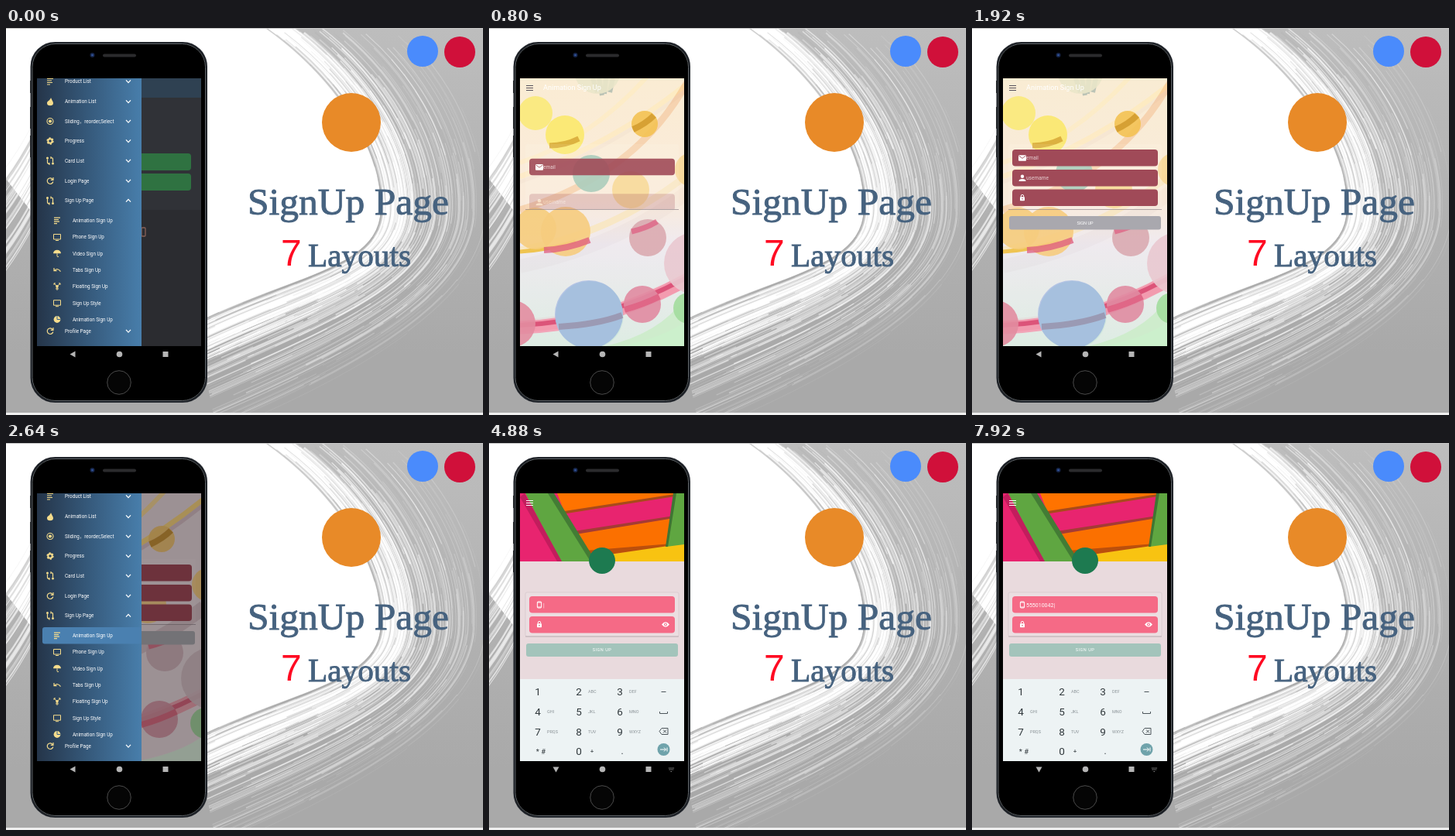
An HTML page with a canvas for the animation above (8 s loop, 616 px wide and 500 px high).

```html
<!DOCTYPE html>
<html lang="en">
<head>
<meta charset="utf-8">
<title>Sign up page layouts</title>
<style>
html, body { margin: 0; width: 100%; height: 100%; overflow: hidden; background: #fff; }
canvas, svg { position: absolute; left: 0; top: 0; display: block; }
svg text { font-family: Roboto, sans-serif; white-space: pre; }
svg .title { font-family: "Liberation Serif", serif; fill: #46627f; stroke: #46627f; stroke-width: .9; }
svg .seven { font-family: "Liberation Sans", sans-serif; fill: #ff0a22; }
</style>
</head>
<body>
<canvas id="back" width="616" height="500"></canvas>
<svg id="stage" width="616" height="500" viewBox="0 0 616 500"></svg>
<script>
const LOOP = 8000;
const el = id => document.getElementById(id);
const clamp = v => Math.max(0, Math.min(1, v));
const ramp = (t, start, len) => clamp((t - start) / len);
const easeOut = p => 1 - (1 - p) ** 3;

// ---- backdrop: a white hollow with a brushed edge on grey ----
function paintBackdrop() {
  const c = el('back').getContext('2d');
  let seed = 7;
  const rnd = () => (seed = (seed * 16807) % 2147483647) / 2147483647;
  // the edge of the hollow, pushed outwards by d
  const edge = d => {
    c.moveTo(365 + d * 1.3, -5);
    c.bezierCurveTo(450 + d * 1.2, 55, 515 + d, 150, 512 + d, 235);
    c.bezierCurveTo(510 + d, 320 + d * .3, 385 + d * .6, 345 + d * .9, 250 + d * .2, 410 + d);
  };
  const grey = c.createLinearGradient(0, 0, 0, 420);
  grey.addColorStop(0, '#bdbdbd');
  grey.addColorStop(1, '#a9a9a9');
  c.fillStyle = grey;
  c.fillRect(0, 0, 616, 500);

  c.fillStyle = '#fff';
  c.beginPath();
  edge(0);
  c.lineTo(35, 240);
  c.lineTo(0, 195);
  c.lineTo(0, -5);
  c.fill();

  for (let i = 0; i < 520; i++) {
    const light = rnd() < .7, spread = rnd() ** 2.2;
    const d = light ? spread * 115 : spread * 100 - 28;
    const alpha = (light ? .75 : .4) * (1 - spread * .75) * (.3 + rnd() * .7);
    c.strokeStyle = light ? `rgba(255,255,255,${alpha})` : `rgba(165,165,165,${alpha})`;
    c.lineWidth = .5 + rnd() * 1.8 * (1 - spread * .6);
    c.setLineDash([80 + rnd() * 220, 1000]);
    c.lineDashOffset = -rnd() * 620;
    c.beginPath();
    edge(d);
    c.stroke();
  }
  c.setLineDash([]);
  for (let i = 0; i < 50; i++) {
    const y = 150 + rnd() * 150;
    c.strokeStyle = rnd() < .65 ? 'rgba(255,255,255,.6)' : 'rgba(175,175,175,.4)';
    c.lineWidth = .5 + rnd() * 1.8;
    c.beginPath();
    c.moveTo(-5, y + 25);
    c.quadraticCurveTo(15, y, 36, y - 40);
    c.stroke();
  }
  c.fillStyle = '#c4c4c4';
  c.fillRect(0, 0, 616, 1);
  c.fillStyle = '#f0f0f0';
  c.fillRect(0, 497, 616, 3);
}

// ---- svg helpers ----
const box = (x, y, w, h, fill, r = 0, extra = '') =>
  `<rect x="${x}" y="${y}" width="${w}" height="${h}" rx="${r}" fill="${fill}" ${extra}/>`;
const disc = (x, y, r, fill, extra = '') => `<circle cx="${x}" cy="${y}" r="${r}" fill="${fill}" ${extra}/>`;
const poly = (points, fill) => `<polygon points="${points}" fill="${fill}"/>`;
const line = (d, col, w = 1, extra = '') =>
  `<path d="${d}" fill="none" stroke="${col}" stroke-width="${w}" ${extra}/>`;
const text = (x, y, s, size, fill, extra = '') =>
  `<text x="${x}" y="${y}" font-size="${size}" fill="${fill}" ${extra}>${s}</text>`;
const group = (id, body, extra = '') => `<g id="${id}" ${extra}>${body}</g>`;
const at = (x, y, body) => `<g transform="translate(${x} ${y})">${body}</g>`;
const mid = 'text-anchor="middle"';
const burger = col => line('M48 74.5h9M48 77.5h9M48 80.5h9', col, 1.1);

const YELLOW = '#f6dc8c';
const ink = (d, w = 1.2) => line(d, YELLOW, w);
const icons = {
  lines: ink('M-4-3.5h8M-4-1h6M-4 1.5h7M-4 4h4'),
  drop: `<path d="M1-5C2-2 4 0 4 2A4 3.2 0 0 1-4 2C-4-1 0-1 1-5" fill="${YELLOW}"/>`,
  radio: disc(0, 0, 4, 'none', `stroke="${YELLOW}" stroke-width="1.1"`) + disc(0, 0, 2.1, YELLOW),
  gear: disc(0, 0, 2.7, 'none', `stroke="${YELLOW}" stroke-width="2"`) +
    disc(0, 0, 4, 'none', `stroke="${YELLOW}" stroke-width="1.4" stroke-dasharray="2.2 2"`),
  swap: ink('M-3.5-2V2Q-3.5 4-1 4M3.5 2V-2Q3.5-4 1-4M-1 2.5V5.5M1-5.5V-2.5') +
    disc(-3.5, -3.5, 1.5, YELLOW) + disc(3.5, 3.5, 1.5, YELLOW),
  refresh: ink('M3.2-2A3.8 3.8 0 1 0 3.8 1M4-4.5V-1.2H.8'),
  tv: ink('M-4.5-3.5h9v6.5h-9zM-2 4.5h4', 1),
  umbrella: `<path d="M-5 0A5 4.5 0 0 1 5 0z" fill="${YELLOW}"/>` + ink('M0 0V3.5Q0 5 2 4', 1),
  undo: ink('M-4-2.5V1H-.5M-3.5 .5Q1-3 4.5 2'),
  people: ink('M-4-4L0 0L4-4M0 0V5M-2 3H2M2-4H4V-2M-2-4H-4V-2', 1) + disc(0, 0, 1.8, YELLOW),
  pie: disc(0, 0, 4.4, YELLOW) + line('M0-4.4V0H4.4', '#3a6287', 1)
};
const white = {
  mail: box(-5, -3.8, 10, 7.6, '#fff', 1) + line('M-4.5-3L0 .4L4.5-3', '#a04e5a', .9),
  person: disc(0, -2.2, 2.2, '#fff') + '<path d="M-4.5 4Q-4.5 1 0 1T4.5 4z" fill="#fff"/>',
  lock: box(-3, -1.2, 6, 5, '#fff', .7) + line('M-1.7-1V-2.4A1.7 1.7 0 0 1 1.7-2.4V-1', '#fff') + disc(0, 1.3, .8, '#c05a70'),
  phone: box(-2.6, -4, 5.2, 8, 'none', 1, 'stroke="#fff"') + line('M-2.6-3h5.2M-2.6 3h5.2', '#fff'),
  eye: '<path d="M-5 0Q0-6.4 5 0Q0 6.4-5 0" fill="#fff"/>' + disc(0, 0, 1.9, '#f56a86') + disc(0, 0, 1, '#fff')
};

// ---- pages ----
const darkPage = box(40, 65, 212, 346, '#464a51') + box(40, 65, 212, 25, '#456078') +
  box(40, 235, 212, 176, '#3f4147') +
  box(52, 162, 187, 22, '#45a860', 4) + box(52, 188, 187, 22, '#45a860', 4) +
  box(175, 258, 5, 11, 'none', 1, 'stroke="#c98f80" stroke-width="1.3"');

// x, y, radius, tinted colour, bright colour
const bubbles = [
  [140, 55, 30, '#9cc3b8', '#fff0cf'], [60, 110, 22, '#f2ca78', '#fdf27a'],
  [98, 138, 25, '#f5c878', '#fdf16a'], [201, 124, 17, '#f0c06c', '#f5c44e'],
  [132, 188, 24, '#98c2b7', '#a9cbb8'], [183, 209, 24, '#f5c878', '#f9dc9a'],
  [262, 183, 22, '#f5c878', '#f9dc9f'], [60, 259, 27, '#f0c780', '#f9cf7c'],
  [99, 263, 32, '#f3c67c', '#f9cf80'], [205, 271, 24, '#d0b0b8', '#deaab0'],
  [266, 304, 40, '#d3bcc2', '#f0ccd4'], [198, 357, 24, '#d493a2', '#e58aa2'],
  [258, 362, 20, '#9fd39a', '#a5dfa0'], [30, 382, 30, '#d69aa5', '#e78aa0']
];
const bubbleArt = k => bubbles.map(b => disc(b[0], b[1], b[2], b[k], 'opacity=".9"')).join('');
// darker parts of the stripes where circles lie over them
const overlaps = (gold, rose) =>
  line('M186 131Q202 124 213 113', gold, 8, 'opacity=".75"') +
  line('M78 152Q98 152 116 143', gold, 7, 'opacity=".65"') +
  line('M71 287Q100 286 130 274', rose, 8, 'opacity=".75"') +
  line('M184 263Q205 258 217 250', rose, 7, 'opacity=".7"') +
  line('M175 364Q200 357 220 347', rose, 8, 'opacity=".75"') +
  line('M90 386Q140 383 172 371', '#95809a', 8, 'opacity=".6"');
const tinted = box(40, 65, 212, 346, '#e6d6da') +
  '<path d="M170 411Q225 400 252 380V411z" fill="#d9ead9"/>' +
  line('M40 192Q160 150 256 72', '#f7d27f', 7) + line('M40 199Q160 157 256 79', '#d5bdc4', 5) +
  line('M40 174Q130 145 205 62', '#f5d596', 6) +
  line('M40 308Q170 280 256 212', '#d3bcc2', 18) +
  line('M40 385Q150 380 256 325', '#eba0ae', 17) + line('M40 384Q150 378 256 323', '#d8657f', 6) +
  bubbleArt(3) + disc(130, 371, 44, '#9cc3b7') + overlaps('#b98226', '#dd6079');
const bright = box(40, 65, 212, 346, 'url(#cream)') +
  '<path d="M150 411Q220 395 252 350V411z" fill="#c9f2c9"/>' +
  line('M40 235Q190 190 256 70', '#fbd3a6', 9) + line('M40 287Q160 265 256 190', '#fdecc0', 9) +
  line('M40 289Q80 286 112 276', '#f2c030', 5) +
  line('M134 65l6 18M142 65l4 22M151 65l-2 20M160 65l-4 18', '#7d9c94', 6, 'opacity=".6"') +
  line('M40 387Q150 384 256 325', '#f59ab0', 17) + line('M40 384Q150 380 256 322', '#de5078', 6) +
  bubbleArt(4) + disc(129, 370, 44, '#a9c0e8') + overlaps('#d19a25', '#e05a80');

const formRow = (i, y, icon, label) => group('row' + i,
  box(52, y, 188, 21.5, '#a04a58', 4) + at(65, y + 11, white[icon]) + text(70, y + 13, label, 6.5, '#e6cfd2'));
const bubblePage = tinted + group('bright', bright) + burger('#57515c') +
  text(70, 80.3, 'Animation Sign Up', 9.1, '#fff') +
  box(47, 150, 198, 84, '#fff', 2, 'opacity=".08"') + line('M47 234.5H245', '#8b7f86', 1, 'opacity=".65"') +
  `<g clip-path="url(#card)">${formRow(0, 157, 'mail', 'email')}${formRow(1, 183, 'person', 'username')}${formRow(2, 208.5, 'lock', '')}</g>` +
  group('row3', box(48, 243, 196, 17.5, '#a9a8ae', 3) + text(146, 254, 'SIGN UP', 5.6, '#fff', mid));

const artwork = box(40, 65, 212, 88, '#e8246f') +
  poly('88,65 240,65 238,69 98,91', '#ff7300') + poly('92,92 240,68 236,99 106,119', '#e8246f') +
  poly('105,118 240,96 235,134 126,146', '#fb7000') + poly('125,139 236,130 236,134 130,147', '#bb4f0c') +
  poly('91,89 240,66 240,69 94,92', '#a84a1a') + poly('103,115 239,94 239,97 106,119', '#a43b35') +
  poly('47,65 80,65 135,153 92,153', '#5fa641') + poly('76,65 84,65 138,153 131,153', '#437c35') +
  poly('40,70 46,65 94,153 88,153', '#c21d5d') +
  poly('135,147 252,130 252,153 135,153', '#f8c311') +
  poly('240,65 252,65 252,131 229,134', '#5fa641') + poly('238,65 242,65 231,134 228,134', '#3f7533');
const phonePage = box(40, 65, 212, 346, '#e9dadd') + artwork + burger('#fff') + disc(146, 152, 17, '#1d7a50') +
  box(47, 193, 198, 57, '#ebdee1', 2, 'stroke="#d5c6ca" stroke-width=".7"') + line('M47 250H245', '#bdafb4') +
  box(52, 198, 188, 21.5, '#f56a86', 4) + box(52, 224, 188, 21.5, '#f56a86', 4) +
  at(65, 209, white.phone) + at(65, 234.5, white.lock) + at(228, 234.5, white.eye) +
  text(70, 211.5, '', 7, '#fff', 'id="typed"') +
  box(48, 259, 196, 17, '#a3c4bb', 3) + text(146, 269.3, 'SIGN UP', 5.6, '#fff', mid + ' letter-spacing=".5"');

// ---- side menu ----
const mainRows = [
  [69, 'lines', 'Product List'], [95, 'drop', 'Animation List'], [120.5, 'radio', 'Sliding，reorder,Select'],
  [146, 'gear', 'Progress'], [171.5, 'swap', 'Card List'], [197.5, 'refresh', 'Login Page'],
  [223, 'swap', 'Sign Up Page'], [391.5, 'refresh', 'Profile Page']
];
const subRows = [
  ['lines', 'Animation Sign Up'], ['tv', 'Phone Sign Up'], ['umbrella', 'Video Sign Up'], ['undo', 'Tabs Sign Up'],
  ['people', 'Floating Sign Up'], ['tv', 'Sign Up Style'], ['pie', 'Animation Sign Up']
];
const menu = box(40, 65, 135, 346, 'url(#blue)') + box(47, 238, 128, 21.5, '#4a80b0', 3, 'id="pick"') +
  mainRows.map(([y, icon, label]) => at(57, y, icons[icon]) + text(76, y + 2.3, label, 6.3, '#fff') +
    at(158, y, line(y === 223 ? 'M-3 1.6L0-1.6L3 1.6' : 'M-3-1.6L0 1.6L3-1.6', '#fff', 1.3))).join('') +
  subRows.map(([icon, label], i) => at(66, 248.7 + i * 21.3, icons[icon]) +
    text(86, 251 + i * 21.3, label, 6.3, '#fff')).join('');

// ---- keyboard ----
const letters = ['', 'ABC', 'DEF', 'GHI', 'JKL', 'MNO', 'PRQS', 'TUV', 'WXYZ'];
const keyX = [63, 116, 169], keyY = [321, 347, 372.5, 398];
const keyboard = box(40, 305, 212, 106, '#edf3f4') +
  letters.map((s, i) => {
    const x = keyX[i % 3], y = keyY[i / 3 | 0];
    return text(x, y + 5, i + 1, 13.5, '#30383c', mid) + text(x + 12, y + 2, s, 5.5, '#8a9296');
  }).join('') +
  text(67, 402, '* #', 9.5, '#30383c', mid) + text(116, 403, 0, 13.5, '#30383c', mid) +
  text(133, 401, '+', 8, '#30383c', mid) + text(172, 402, '.', 12, '#30383c', mid) +
  line('M222.5 321.5h6M220.5 347v2.5h10v-2.5', '#4c555a') +
  line('M220 372.5l3-4h8v8h-8zM225 370.5l4 4M229 370.5l-4 4', '#4c555a') +
  disc(225.5, 396, 8, '#6fa3ab') + line('M221 396h7M226 393.5l2.5 2.5l-2.5 2.5M230 393.5v5', '#fff');

// ---- whole stage ----
el('stage').innerHTML = `<defs>
  <linearGradient id="blue"><stop stop-color="#253549"/><stop offset=".5" stop-color="#365a7c"/><stop offset="1" stop-color="#487eab"/></linearGradient>
  <linearGradient id="cream" x2="0" y2="1"><stop stop-color="#fff2d2"/><stop offset=".45" stop-color="#fff1dc"/><stop offset=".62" stop-color="#f2f0f5"/><stop offset="1" stop-color="#dcf2e6"/></linearGradient>
  <clipPath id="screen"><rect x="40" y="65" width="212" height="346"/></clipPath>
  <clipPath id="card"><rect x="47" y="150" width="198" height="84"/></clipPath></defs>` +
  disc(538, 30, 20, '#4a8bfc') + disc(586, 31, 20, '#d0103a') + disc(446, 122, 38, '#e88a28') +
  text(312, 241, 'SignUp Page', 49.5, '', 'class="title"') +
  text(355, 307, '7', 48, '', 'class="seven"') + text(390, 308, 'Layouts', 41.3, '', 'class="title"') +
  box(31, 68, 3, 16, '#333') + box(31, 102, 3, 28, '#333') + box(31, 139, 3, 28, '#333') + box(257, 104, 3, 28, '#333') +
  box(32.5, 19, 226.5, 464, '#000', 31, 'stroke="#20242a" stroke-width="2"') +
  box(34, 20.5, 223.5, 461, 'none', 30, 'stroke="#666b70" stroke-width=".9"') +
  disc(111.5, 35, 3, '#17264a') + disc(111.5, 35, 1.3, '#3456a0') + box(125, 33.5, 43, 4, '#2b2b2d', 2) +
  disc(146, 458, 15.3, '#050505', 'stroke="#4a4a4a"') +
  `<g clip-path="url(#screen)">${darkPage}${group('bubblePage', bubblePage)}${group('phonePage', phonePage)}` +
  box(40, 65, 212, 346, '#000', 0, 'id="shade"') + group('menu', menu) + group('keys', keyboard) + '</g>' +
  group('back-key', poly('82.5,421.5 89.5,417.5 89.5,425.5', '#b5b5b5')) +
  disc(146.5, 421.5, 3.8, '#b5b5b5') + box(202.5, 418, 7, 7, '#b5b5b5') +
  group('key-hint', line('M232 420h7M232.5 422h6M234.5 424.5h2', '#8d8d8d', 1, 'stroke-dasharray="1.4 .5"'));

const NUMBER = '555010042';
const strokes = [5360, 5600, 5920, 6160, 6400, 6640, 6960, 7280, 7720];
const set = (id, key, value) => el(id).setAttribute(key, value);
const shift = (id, x, y) => set(id, 'transform', `translate(${x} ${y})`);

function draw(t) {
  const open = 1 - easeOut(ramp(t, 405, 260)) + easeOut(ramp(t, 2240, 260)) - easeOut(ramp(t, 3040, 260));
  shift('menu', -135 * (1 - open), 0);
  set('menu', 'visibility', open > .001 ? 'visible' : 'hidden');
  set('shade', 'opacity', .32 * open ** 3);

  const pressed = t >= 160 && t < 700 || t >= 2800;
  set('pick', 'opacity', t < 160 ? 0 : 1);
  set('pick', 'fill', pressed ? '#3b5c7c' : '#4a80b0');
  set('pick', 'y', t < 2800 ? 238 : 259.5);

  set('bubblePage', 'opacity', ramp(t, 240, 160));
  set('phonePage', 'opacity', ramp(t, 2880, 160));
  set('bright', 'opacity', ramp(t, 560, 300) - ramp(t, 1840, 400));
  for (let i = 0; i < 4; i++) {
    const p = easeOut(ramp(t, 640 + i * 130, 500));
    shift('row' + i, 0, 38 * (1 - p));
    set('row' + i, 'opacity', clamp(p * 1.3));
  }

  const up = easeOut(ramp(t, 4520, 260));
  shift('keys', 0, 107 * (1 - up));
  set('back-key', 'transform', up > 0 ? 'rotate(-90 86.5 421.5)' : '');
  set('key-hint', 'opacity', up > 0 ? 1 : 0);
  const count = strokes.filter(s => t >= s).length;
  el('typed').textContent = t < 4480 ? '' : NUMBER.slice(0, count) + '|';
}

paintBackdrop();
const start = performance.now();
function tick() {
  draw((performance.now() - start) % LOOP);
  requestAnimationFrame(tick);
}
tick();
</script>
</body>
</html>
```
